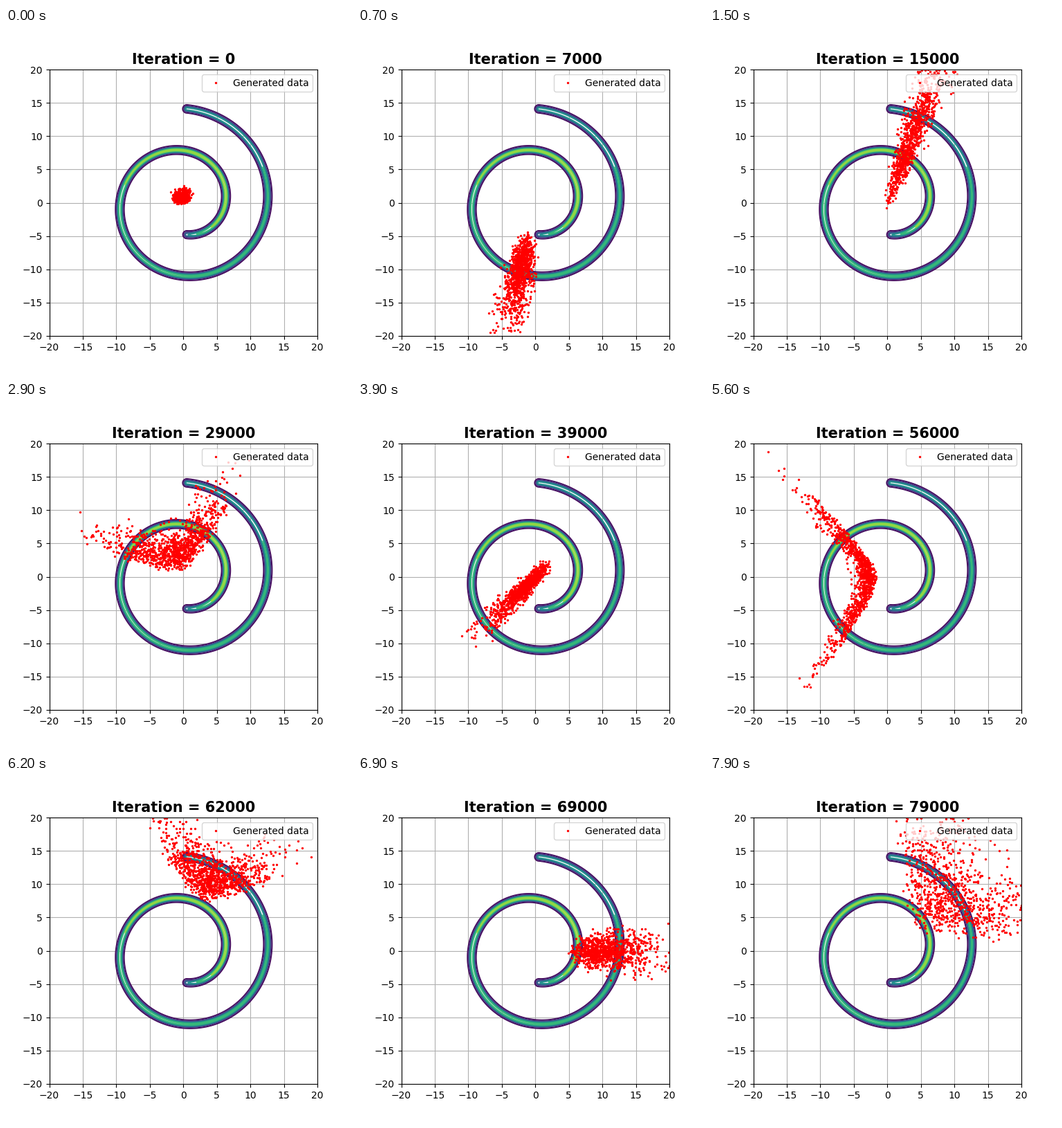
These frames come from a looping animation (500 by 500 pixels, 8 s). A matplotlib script:

```python
import numpy as np
import matplotlib.pyplot as plt
from matplotlib.animation import FuncAnimation

FRAMES, STEP_MS, POINTS = 80, 100, 1000
LIMIT = 20
T_START, T_END = 4.82, 14.1
SIGMA = 0.25

# Key poses of the cloud: when, unwrapped heading in degrees,
# distance from the centre, depth along the heading, width across it.
KEYS = [0, 15, 29, 39, 56, 69, 79]
HEADING = [107, 430, 830, 1305, 1984, 2520, 2925]
NEAR = [-0.1, -0.5, 1.0, -3.0, 1.6, 5.0, 5.5]
DEPTH = [0.6, 9.0, 2.0, 4.2, 1.0, 4.0, 4.5]
WIDTH = [0.5, 0.4, 4.5, 0.45, 6.0, 0.9, 6.5]
BEND, FAN, SURGE = 0.8, 0.05, 5

rng = np.random.default_rng(7)
side = rng.standard_normal(POINTS)
depth = np.log1p(np.exp(rng.standard_normal(POINTS) + 1))
depth += 0.15 * rng.standard_normal(POINTS)


def ridge(t):
    """Density along the spiral: quick rise, then slow decay."""
    return 5 * (9.2 / t) ** 0.645 * (1 - np.exp((4.4 - t) / 0.9))


def spiral_density(x, y):
    """Gaussian ridge around the curve (t cos t, t sin t)."""
    phi = np.arctan2(y, x)
    turns = np.round((np.hypot(x, y) - phi) / (2 * np.pi))
    t = np.clip(phi + 2 * np.pi * turns, T_START, T_END)
    for _ in range(4):
        c, s = np.cos(t), np.sin(t)
        along = (x - t * c) * (c - t * s) + (y - t * s) * (s + t * c)
        t = np.clip(t + along / (1 + t * t), T_START, T_END)
    dist2 = (x - t * np.cos(t)) ** 2 + (y - t * np.sin(t)) ** 2
    return ridge(t) * np.exp(-dist2 / (2 * SIGMA ** 2))


def cloud(k):
    heading, near, deep, wide = (
        np.interp(k, KEYS, track) for track in (HEADING, NEAR, DEPTH, WIDTH))
    phase = np.interp(k, KEYS, range(len(KEYS)))
    near += SURGE * np.sin(np.pi * phase) ** 2
    u = near + deep * depth
    v = (wide + FAN * np.abs(u)) * side
    u += BEND * (np.hypot(v, 3) - 3)
    c, s = np.cos(np.radians(heading)), np.sin(np.radians(heading))
    return u * c - v * s, u * s + v * c


fig, ax = plt.subplots(figsize=(5, 5), dpi=100)
axis = np.linspace(-LIMIT, LIMIT, 600)
gx, gy = np.meshgrid(axis, axis)
ax.contour(gx, gy, spiral_density(gx, gy), levels=[0.2, 1, 2, 3, 4, 5],
           cmap="viridis", vmin=0, vmax=6)
dots, = ax.plot([], [], "r.", markersize=2.8, label="Generated data")
ticks = np.arange(-LIMIT, LIMIT + 1, 5)
ax.set(xlim=(-LIMIT, LIMIT), ylim=(-LIMIT, LIMIT), xticks=ticks, yticks=ticks)
ax.grid(True)
ax.legend(loc="upper right")
title = ax.set_title("", fontsize=15, fontweight="bold")


def draw(k):
    dots.set_data(*cloud(k))
    title.set_text(f"Iteration = {k * 1000}")
    return dots, title


anim = FuncAnimation(fig, draw, frames=FRAMES, interval=STEP_MS,
                     repeat=True, repeat_delay=0, blit=False)
plt.show()
```
